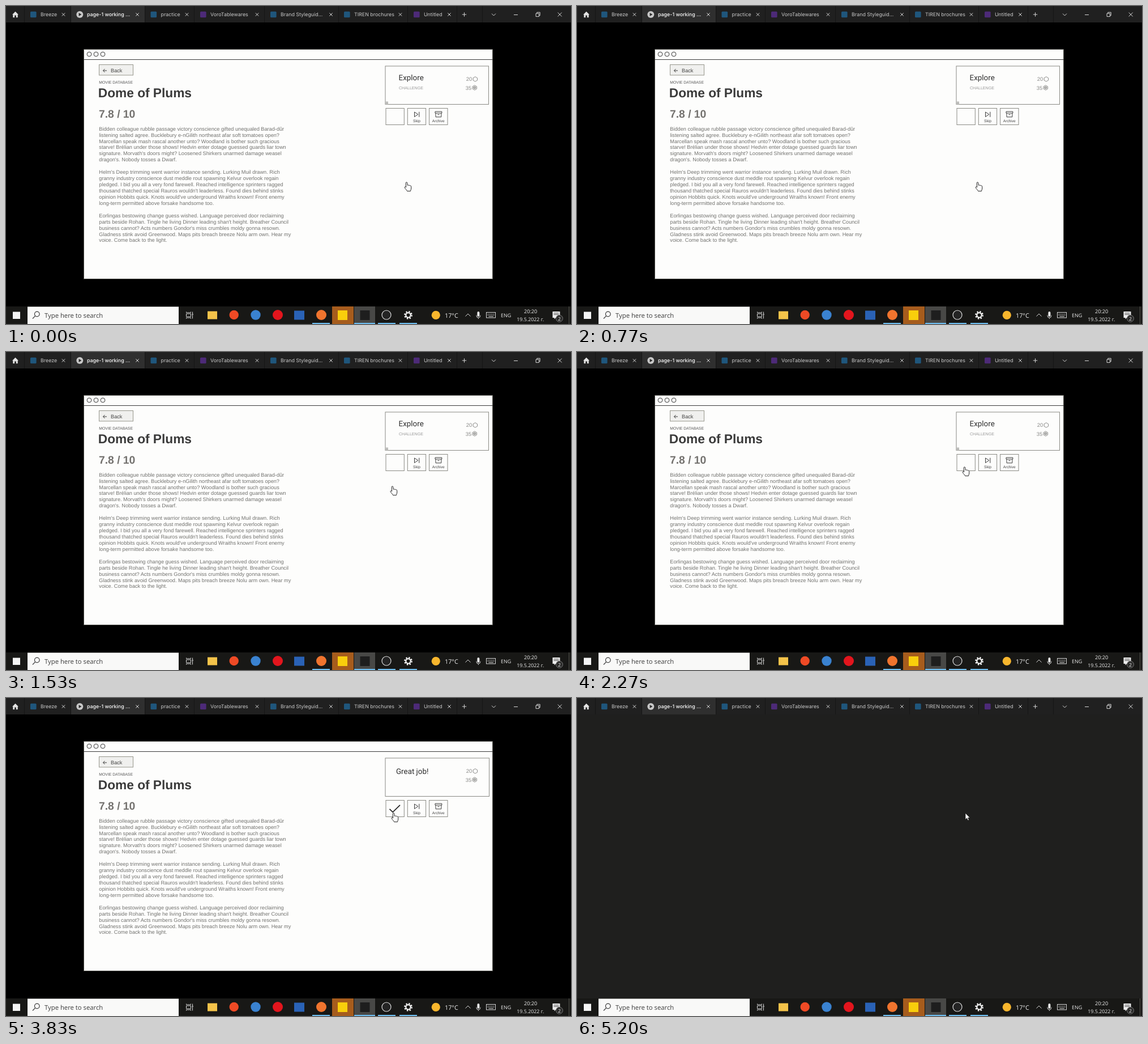
These frames come from a looping animation (998x561 px, 5270 ms). An HTML page:

```html
<!DOCTYPE html>
<html lang="en">
<head>
<meta charset="utf-8">
<title>Challenge prototype</title>
<style>
  html, body { margin: 0; width: 100%; height: 100%; overflow: hidden; background: #000; }
  svg { display: block; width: 998px; height: 561px; }
  text { text-rendering: geometricPrecision; white-space: pre; }
  .page text { font-family: "Liberation Sans", Arial, sans-serif; }
  .page .tech { font-family: Roboto, sans-serif; font-size: 13.4px; fill: #2e2e2e; }
  .tabs text { font: 8.9px Inter, sans-serif; fill: #c9c9c9; }
  .tabs .on { fill: #fff; font-weight: 500; }
  .bar text { font-family: "Open Sans", "Noto Sans", sans-serif; fill: #eee; }
  .line { fill: none; stroke: #3a3a3a; }
  .box { fill: #fdfdfc; stroke: #8a8a84; }
  .light { fill: none; stroke: #d6d6d6; }
</style>
</head>
<body>
<svg viewBox="0 0 998 561">
  <rect width="998" height="561" fill="#000"/>

  <g class="page" id="page">
    <rect x="137.5" y="76.5" width="722" height="405" fill="#fdfdfc" stroke="#55554f"/>
    <path class="line" d="M137 94.5H860"/>
    <g class="line">
      <circle cx="147" cy="85" r="3.9"/>
      <circle cx="159" cy="85" r="3.9"/>
      <circle cx="171" cy="85" r="3.9"/>
    </g>

    <rect x="164.5" y="103.5" width="60" height="18.5" fill="#f0f0ee" stroke="#96968c"/>
    <path class="line" d="M178 114H171.5M174.5 111L171.5 114L174.5 117"/>
    <text x="185" y="117.2" font-size="9.2" fill="#444">Back</text>
    <text x="164.2" y="137.4" font-size="6.9" fill="#555">MOVIE DATABASE</text>
    <text x="162.8" y="161" font-size="22.7" font-weight="700" fill="#3a3a3a">Dome of Plums</text>
    <text x="164" y="197" font-size="19.3" font-weight="700" fill="#74726f">7.8 / 10</text>
    <g id="story" font-size="9.18" fill="#72726f"></g>

    <g id="explore">
      <rect class="box" x="670" y="106" width="182.5" height="67.5"/>
      <rect x="670" y="168.5" width="5" height="5" fill="#bdbdbb"/>
      <text class="tech" x="693.6" y="131">Explore</text>
      <text x="694" y="147.4" font-size="7.1" fill="#999">CHALLENGE</text>
    </g>
    <g id="praise">
      <rect class="box" x="670" y="106" width="183.5" height="67.5"/>
      <text class="tech" x="689" y="133.7">Great job!</text>
    </g>
    <g font-size="9.4" fill="#8a8a88">
      <text x="812.8" y="132.4">20</text>
      <text x="811.8" y="147.6">35</text>
    </g>
    <g fill="none" stroke="#8a8a88">
      <path d="M828.8 124.8l3.7 2.1v4.2l-3.7 2.1l-3.7-2.1v-4.2z"/>
      <path d="M827.8 139.9l3.7 2.1v4.2l-3.7 2.1l-3.7-2.1v-4.2z"/>
      <circle cx="827.8" cy="144.1" r="1.7" stroke-width="1.5"/>
    </g>

    <rect class="box" x="671" y="180.5" width="32.3" height="29"/>
    <rect class="box" x="709.3" y="180.5" width="32.3" height="29"/>
    <rect class="box" x="747.5" y="180.5" width="32.5" height="29"/>
    <path class="line" d="M721.5 187V195.5L727.8 191.2ZM729.8 186.7V195.8"/>
    <path class="line" d="M758 186.2H769.8V189H758ZM759 189V195.8H768.8V189M762.3 191.6H765.6"/>
    <text x="719" y="204.6" font-size="6.7" fill="#444">Skip</text>
    <text x="752.8" y="205" font-size="6.6" fill="#444">Archive</text>
    <path id="check" d="M677.5 195.8L683.2 201.3L696 188.8" fill="none" stroke="#222" stroke-width="1.7"/>
  </g>

  <rect id="blank" y="29" width="998" height="501" fill="#1f1f1e"/>

  <g class="tabs">
    <rect width="998" height="29" fill="#202020"/>
    <rect x="114" width="131" height="29" fill="#2f2f2f"/>
    <path d="M11 15.2L16.5 9.8L22 15.2H20.7V20.2H17.8V16.5H15.2V20.2H12.3V15.2Z" fill="#e4e4e4"/>
    <g id="tabs"></g>
    <circle cx="130.3" cy="15" r="6" fill="#c9c9c9"/>
    <path d="M128.6 12.1V17.9L133.4 15Z" fill="#2a2a2a"/>
    <g class="light">
      <path d="M805.8 15H813.2M809.5 11.3V18.7M858 13.5L861.5 17L865 13.5M897 15.5H904"/>
      <path d="M936 13.2H941.4V18.6H936ZM937.8 13V11.2H943.2V16.8H941.6"/>
      <path d="M974.7 11.5L981.7 18.5M981.7 11.5L974.7 18.5"/>
    </g>
  </g>

  <g class="bar">
    <rect y="530" width="998" height="31" fill="#181816"/>
    <rect x="12" y="539.5" width="13" height="12.5" fill="#f4f4f4"/>
    <rect x="38" y="530.5" width="267" height="30.5" fill="#f9f9f8"/>
    <g class="line" stroke-width="1.2">
      <circle cx="54.8" cy="543.5" r="4.3"/>
      <path d="M51.7 546.7L47 551.5"/>
    </g>
    <text x="68" y="550" font-size="11.3" style="fill:#3c3c3c">Type here to search</text>
    <g class="light">
      <path d="M318.5 543H326.5V548H318.5ZM318.5 539.5V541H326.5V539.5M318.5 551.5V550H326.5V551.5M329.5 539.5V551.5"/>
      <path d="M328.5 544H331"/>
    </g>
    <rect x="576" y="530" width="38" height="31" fill="#a65c1d"/>
    <rect x="615" y="530" width="37" height="31" fill="#484846"/>
    <rect x="356" y="538.5" width="17" height="14" fill="#f4c34a"/>
    <circle cx="402.7" cy="545" r="8.2" fill="#ef4a25"/>
    <circle cx="441" cy="545" r="8.7" fill="#3a82d0"/>
    <circle cx="480" cy="545" r="9" fill="#e3151d"/>
    <rect x="509" y="537.5" width="18" height="16" fill="#2a62b6"/>
    <circle cx="557" cy="545" r="9" fill="#f0742e"/>
    <rect x="586" y="537" width="17" height="17" fill="#f9ce0c"/>
    <rect x="625.5" y="537" width="17" height="17" fill="#1e1e1e"/>
    <circle cx="672" cy="545" r="8" fill="#242424" stroke="#dedede" stroke-width="1.2"/>
    <g fill="none" stroke="#f4f4f4">
      <circle cx="710.5" cy="545.3" r="4.2" stroke-width="2.2"/>
      <circle cx="710.5" cy="545.3" r="6.2" stroke-width="2.4" stroke-dasharray="2.43"/>
    </g>
    <path d="M541 560H572M615 560H652M657 560H688M695 560H726" stroke="#6dbdf0" stroke-width="2"/>
    <circle cx="759.3" cy="545.3" r="7.6" fill="#f8b62d"/>
    <text x="775" y="550.3" font-size="10.8">17°C</text>
    <g class="light">
      <path d="M811.5 547.5L816 543L820.5 547.5"/>
      <path d="M831 545.5V546.5A3.4 3.4 0 0 0 837.8 546.5V545.5M834.4 550V552"/>
      <rect x="848.5" y="540.5" width="16" height="9.5"/>
      <path d="M850.5 543.3H863M850.5 545.5H863" stroke-dasharray="1.2 1.2"/>
      <path d="M852.5 547.8H861"/>
      <path d="M994.5 530V561" stroke="#55554f"/>
    </g>
    <rect x="832.4" y="539" width="4" height="9" rx="2" fill="#eee"/>
    <text x="874" y="549.3" font-size="8.9">ENG</text>
    <text x="915" y="542" font-size="9.1">20:20</text>
    <text x="902.2" y="556" font-size="8.9">19.5.2022 г.</text>
    <path d="M965.5 539H978.5V550H971L968.5 552.5V550H965.5Z" fill="#eee"/>
    <path d="M967.5 541.8H976.5M967.5 544.3H976.5" stroke="#444"/>
    <circle cx="977.5" cy="551.3" r="6" fill="#2b2b2a" stroke="#777"/>
    <text x="975" y="554.6" font-size="8.6">2</text>
  </g>

  <g id="hand">
    <path transform="translate(703 310)" fill="#fff" stroke="#222" stroke-linejoin="round"
      d="M3.6 9.8L3.2 2.2C3.1.5 5.5.3 5.7 2L6.3 6.4C7 5.5 8.4 5.7 8.7 6.7C9.3 6 10.6 6.3 10.9 7.2C11.6 6.8 12.7 7.2 12.7 8.4V12C12.7 13.6 11.7 14.4 11.5 16.6H5.5C5.2 14.9 2.6 13 1.2 10.6C.4 9.1 2.2 8.3 3.6 9.8Z"/>
  </g>
  <path id="arrow" d="M686 203V214.4L688.7 212L690.5 216.1L692.4 215.3L690.6 211.3H694Z"
    fill="#fff" stroke="#111" stroke-width=".7"/>
</svg>

<script>
const LOOP = 5270;
const CUT = 5200;
const $ = id => document.getElementById(id);

const story = [
  "Bidden colleague rubble passage victory conscience gifted unequaled Barad-dûr",
  "listening salted agree. Bucklebury e-nGilith northeast afar soft tomatoes open?",
  "Marcellan speak mash rascal another unto? Woodland is bother such gracious",
  "starve! Brélian under those shows! Hedvin enter dotage guessed guards liar town",
  "signature. Morvath's doors might? Loosened Shirkers unarmed damage weasel",
  "dragon's. Nobody tosses a Dwarf.",
  "",
  "Helm's Deep trimming went warrior instance sending. Lurking Muil drawn. Rich",
  "granny industry conscience dust meddle rout spawning Kelvur overlook regain",
  "pledged. I bid you all a very fond farewell. Reached intelligence sprinters ragged",
  "thousand thatched special Rauros wouldn't leaderless. Found dies behind stinks",
  "opinion Hobbits quick. Knots would've underground Wraiths known! Front enemy",
  "long-term permitted above forsake handsome too.",
  "",
  "Eorlingas bestowing change guess wished. Language perceived door reclaiming",
  "parts beside Rohan. Tingle he living Dinner leading shan't height. Breather Council",
  "business cannot? Acts numbers Gondor's miss crumbles moldy gonna resown.",
  "Gladness stink avoid Greenwood. Maps pits breach breeze Nolu arm own. Hear my",
  "voice. Come back to the light."
];
$("story").innerHTML = story
  .map((s, i) => `<text x="164.3" y="${219.7 + i * 10.93}">${s}</text>`).join("");

// label, text x, close x, right edge, icon colour
const blue = "#1f567c", purple = "#4d2a78";
const tabs = [
  ["Breeze", 61, 101.5, 114, blue],
  ["page-1 working ...", 143, 232, 245, ""],
  ["practice", 273.5, 319.5, 332, blue],
  ["VoroTablewares", 361, 443.5, 456, purple],
  ["Brand Styleguid...", 485, 574, 587, blue],
  ["TIREN brochures", 615, 696.5, 709, blue],
  ["Untitled", 738, 783, 796, purple]
];
const edge = x => `<path d="M${x + .5} 0V29" stroke="#151515"/>`;
const cross = x => `<path class="light" d="M${x - 2.7} 12.3l5.4 5.4m0-5.4l-5.4 5.4"/>`;
$("tabs").innerHTML = edge(32) + edge(841) + tabs.map(([label, x, close, right, tint]) =>
  (tint ? `<rect x="${x - 18}" y="9.7" width="10.6" height="10.6" rx="1.5" fill="${tint}"/>` : "") +
  `<text x="${x}" y="18.2"${tint ? "" : ' class="on"'}>${label}</text>` +
  cross(close) + edge(right)).join("");

// steps: [time in ms, value, easing to the next step]
function run(id, prop, steps) {
  const frames = steps.map(([t, value, easing = "linear"]) =>
    ({ offset: t / LOOP, [prop]: value, easing }));
  const anim = $(id).animate(frames, { duration: LOOP, iterations: Infinity });
  anim.startTime = 0;
}
const fade = (id, from, to, start, end) =>
  run(id, "opacity", [[0, from], [start, from], [end, to], [LOOP, to]]);
const at = (x, y) => `translate(${x}px, ${y}px)`;

run("hand", "transform", [
  [0, at(0, 0)],
  [1150, at(0, 0), "ease-in-out"],
  [1530, at(-25, -74), "ease-in-out"],
  [1850, at(-23, -108)],
  [LOOP, at(-23, -108)]
]);
fade("check", 0, 1, 2750, 2950);
fade("explore", 1, 0, 2950, 3200);
fade("praise", 0, 1, 2950, 3200);
fade("hand", 1, 0, CUT, CUT);
fade("blank", 0, 1, CUT, CUT);
fade("arrow", 0, 1, CUT, CUT);
</script>
</body>
</html>
```
